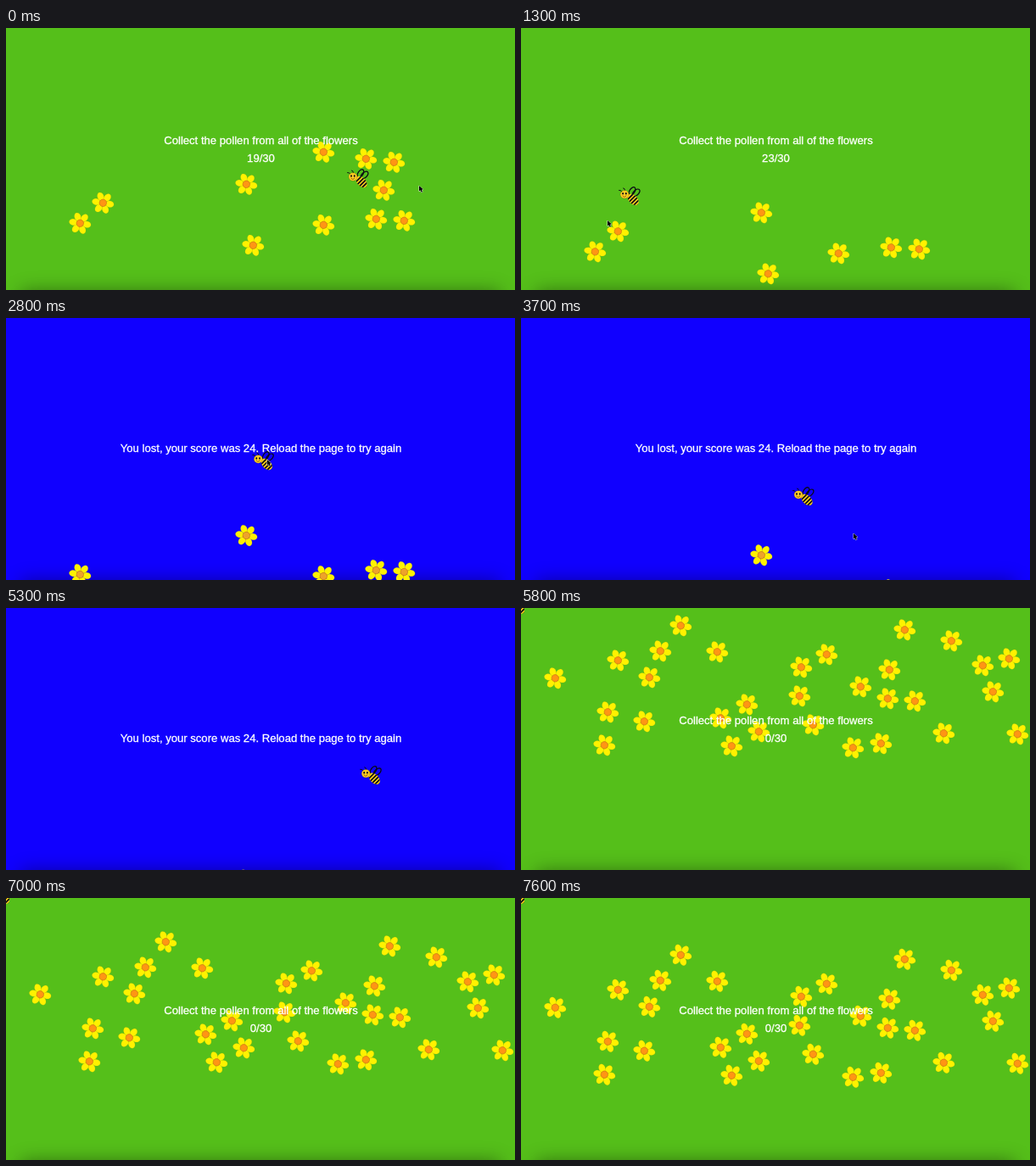
Animation of 600x309 px, one loop 7700 ms. Source, as an HTML page with a canvas:

```html
<!DOCTYPE html>
<html lang="en">
<head>
<meta charset="utf-8">
<title>Pollen game</title>
<style>
  html, body { margin: 0; width: 100%; height: 100%; overflow: hidden; background: #55bf1a; }
  canvas { display: block; width: 600px; height: 309px; }
</style>
</head>
<body>
<canvas id="stage" width="600" height="309"></canvas>
<script>
const ctx = document.getElementById('stage').getContext('2d');
const LOOP = 7700, STEP = 100;
const LOST_AT = 1800, EXIT_AT = 4300, GONE_AT = 4700, RELOAD_AT = 5600;
const FALL = 0.0258;  // px per ms
const CHASE = 0.33;   // share of the gap the bee closes per step
const REACH = 22;     // distance at which the bee collects a flower
const GREEN = '#55bf1a', BLUE = '#1000ff', DARK = '#0a0a14';

// Flowers left at the start of the loop
const field = [
  [374, 146], [424, 154], [457, 158], [445, 191], [283, 184], [114, 206],
  [87, 230], [291, 256], [374, 232], [436, 225], [469, 227]
];
// Scatter after the reload, as it stands 800 ms later
const newField = [
  [188, 36], [164, 66], [231, 67], [114, 77], [151, 97], [40, 98],
  [102, 138], [145, 149], [98, 177], [235, 145], [266, 129], [280, 161],
  [248, 178], [328, 119], [330, 85], [360, 70], [344, 153], [400, 108],
  [434, 88], [432, 122], [464, 125], [452, 41], [507, 54], [544, 83],
  [575, 75], [556, 114], [498, 163], [585, 164], [424, 175], [391, 180]
];
// Turns of the cursor: time, x, y
const turns = [
  [0, 487, 186], [200, 480, 174], [400, 385, 168], [800, 160, 128],
  [1000, 110, 180], [1300, 102, 227], [1500, 112, 250], [1700, 225, 232],
  [1900, 258, 228], [2500, 310, 156], [3600, 302, 196], [3700, 392, 254],
  [EXIT_AT, 430, 197], [GONE_AT, 44, 0]
];

function cursorAt(t) {
  const i = Math.max(1, turns.findIndex(p => p[0] >= t));
  const [t0, x0, y0] = turns[i - 1], [t1, x1, y1] = turns[i];
  const u = (t - t0) / (t1 - t0);
  return [x0 + (x1 - x0) * u, y0 + (y1 - y0) * u];
}

// The bee chases the cursor until it heads for the reload button
function play() {
  const flight = [[414.5, 177.5]];
  const taken = field.map(() => Infinity);
  for (let t = STEP; t < RELOAD_AT; t += STEP) {
    const [x, y] = flight[flight.length - 1];
    const [cx, cy] = cursorAt(Math.min(t, EXIT_AT));
    const bx = x + (cx - x) * CHASE, by = y + (cy - y) * CHASE;
    flight.push([bx, by]);
    if (t >= LOST_AT) continue;
    field.forEach(([fx, fy], i) => {
      if (Math.hypot(fx - bx, fy + t * FALL - by) < REACH) taken[i] = Math.min(taken[i], t);
    });
  }
  return { flight, taken };
}
const { flight, taken } = play();

function at(x, y, draw) {
  ctx.save();
  ctx.translate(x, y);
  draw();
  ctx.restore();
}

function oval(x, y, rx, ry, turn, fill, line, width) {
  ctx.beginPath();
  ctx.ellipse(x, y, rx, ry, turn, 0, Math.PI * 2);
  if (fill) { ctx.fillStyle = fill; ctx.fill(); }
  if (line) { ctx.strokeStyle = line; ctx.lineWidth = width; ctx.stroke(); }
}

function flower(x, y, lost) {
  at(x, y, () => {
    for (let i = 0; i < 6; i++) {
      const a = i * Math.PI / 3 + 0.17;
      oval(Math.cos(a) * 8, Math.sin(a) * 8, 5, 3.8, a, '#fff200', 'rgba(200,170,0,.4)', 0.4);
    }
    oval(0, 0, 4.2, 4.2, 0, lost ? '#eda32a' : '#ff9514', '#c87814', 0.7);
  });
}

function bee(x, y) {
  at(x, y, () => {
    ctx.lineCap = 'round';
    oval(3.5, -6, 5.2, 3, -1, null, DARK, 1.3);
    oval(8, -4, 5.4, 3, -0.75, null, DARK, 1.3);

    ctx.save();
    ctx.translate(4.5, 4);
    ctx.rotate(Math.PI / 4);
    oval(0, 0, 8, 5, 0, '#ffd21a');
    ctx.clip();
    ctx.fillStyle = DARK;
    for (let s = -5.5; s < 8; s += 3.3) ctx.fillRect(s, -6, 1.7, 12);
    ctx.restore();

    ctx.strokeStyle = DARK;
    ctx.lineWidth = 0.9;
    ctx.beginPath();
    ctx.moveTo(-8.5, -5);
    ctx.quadraticCurveTo(-9.5, -7.5, -12, -7);
    ctx.moveTo(-5, -6.5);
    ctx.quadraticCurveTo(-5, -9.5, -7, -9.5);
    ctx.stroke();

    oval(-5.5, -2, 5, 4.8, 0, '#ffcd22', 'rgba(90,60,0,.5)', 0.5);
    for (const eye of [-7.5, -3.8]) oval(eye, -3, 0.9, 1.2, 0, DARK);
    ctx.strokeStyle = '#70400a';
    ctx.lineWidth = 0.7;
    ctx.beginPath();
    ctx.arc(-5.7, -1.2, 2.1, 0.3, 2.8);
    ctx.stroke();
  });
}

function cursor(x, y) {
  at(x, y, () => {
    const arrow = new Path2D('M0 0V6.6L1.6 5.3 2.7 7.8 4 7.2 2.9 4.8 4.9 4.6Z');
    ctx.strokeStyle = 'rgba(255,255,255,.8)';
    ctx.lineWidth = 1;
    ctx.stroke(arrow);
    ctx.fillStyle = '#000';
    ctx.fill(arrow);
  });
}

function label(text, y) {
  ctx.font = '13.1px "Liberation Sans", Helvetica, Arial, sans-serif';
  ctx.textAlign = 'center';
  ctx.fillStyle = ctx.strokeStyle = '#fff';
  ctx.lineWidth = 0.3;
  ctx.fillText(text, 300.5, y);
  ctx.strokeText(text, 300.5, y);
}

function background(color) {
  ctx.fillStyle = color;
  ctx.fillRect(0, 0, 600, 309);
  ctx.save();
  ctx.shadowColor = 'rgba(0,0,0,.45)';
  ctx.shadowBlur = 22;
  ctx.fillRect(18, 311, 564, 20);
  ctx.restore();
}

function render(t) {
  const fresh = t >= RELOAD_AT;
  const lost = t >= LOST_AT && !fresh;
  background(lost ? BLUE : GREEN);

  const flowers = fresh ? newField : field.filter((f, i) => t < taken[i]);
  const drop = (fresh ? t - RELOAD_AT - 800 : t) * FALL;
  for (const [x, y] of flowers) flower(x + 0.3, y + 0.3 + drop, lost);

  if (lost) {
    label('You lost, your score was 24. Reload the page to try again', 157.6);
  } else {
    const score = fresh ? 0 : 30 - flowers.length;
    label('Collect the pollen from all of the flowers', 137.2);
    label(score + '/30', 157.6);
  }

  if (fresh) bee(-7, -4);
  else bee(...flight[t / STEP]);
  if (t <= GONE_AT) cursor(...cursorAt(t));
}

let start = null;
function tick(now) {
  if (start === null) start = now;
  const t = Math.max(0, now - start) % LOOP;
  render(Math.floor(t / STEP) * STEP);
  requestAnimationFrame(tick);
}
render(0);
requestAnimationFrame(tick);
</script>
</body>
</html>
```
